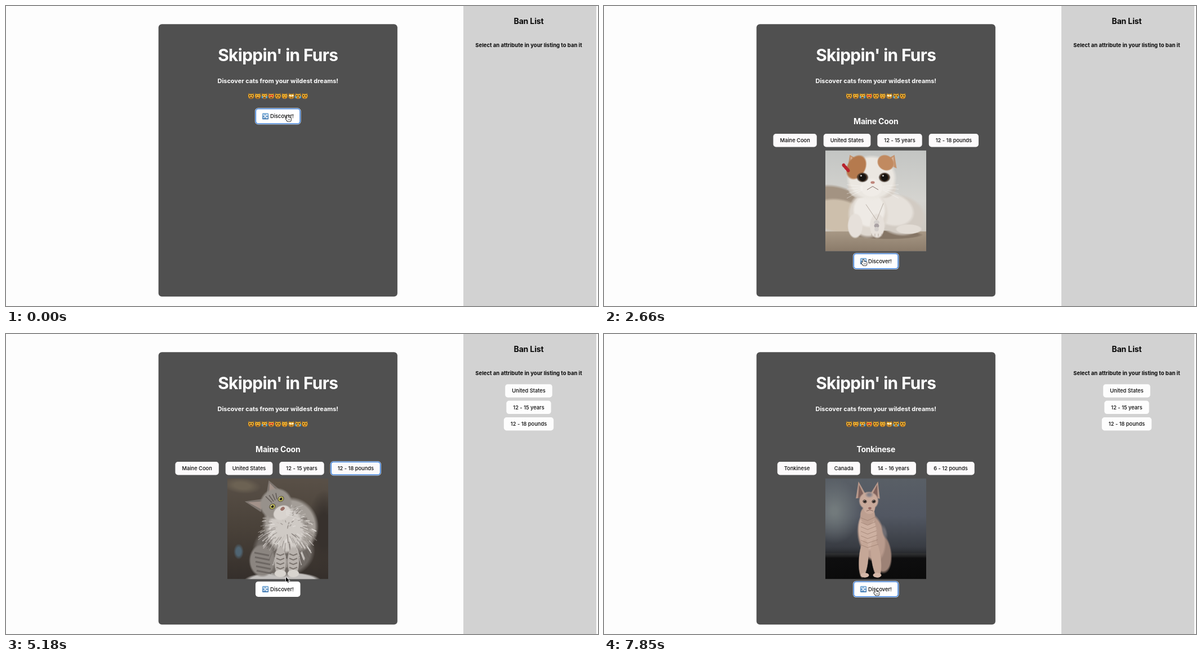
Animation, 1051 px wide and 533 px high, one loop 8000 ms. Source, as an HTML page with a canvas:

```html
<!DOCTYPE html>
<html lang="en">
<head>
<meta charset="utf-8">
<title>Skippin' in Furs</title>
<style>
  html, body { margin: 0; width: 100%; height: 100%; overflow: hidden; background: #fdfdfd; }
  canvas { display: block; width: 1051px; height: 533px; }
</style>
</head>
<body>
<canvas id="stage"></canvas>
<script>
const W = 1051, H = 533, LOOP = 8000, STEP = 148;
const MID = 482.75, PANEL_MID = 928, ROW_Y = 227, TAG_H = 23.5;
const FONT = 'Inter, "Open Sans", sans-serif';
const PHOTO = { x: 393, y: 256.5, size: 179 };

const canvas = document.getElementById('stage');
const ctx = canvas.getContext('2d');
const ratio = window.devicePixelRatio || 1;
canvas.width = Math.round(W * ratio);
canvas.height = Math.round(H * ratio);

const listings = [
  { at: 140, tags: ['Exotic Shorthair', 'United States', '12 - 15 years', '7 - 14 pounds'] },
  { at: 2660, tags: ['Maine Coon', 'United States', '12 - 15 years', '12 - 18 pounds'] },
  { at: 5920, tags: ['Sphynx', 'Canada', '12 - 14 years', '6 - 12 pounds'] },
  { at: 7850, tags: ['Tonkinese', 'Canada', '14 - 16 years', '6 - 12 pounds'] }
];
const photos = [
  { at: 590, draw: drawShorthair },
  { at: 3100, draw: drawCoon },
  { at: 6510, draw: drawSphynx }
];
const bans = [
  { at: 3980, label: 'United States' },
  { at: 4280, label: '12 - 15 years' },
  { at: 4730, label: '12 - 18 pounds' }
];
const focuses = [{ at: 0, label: 'Discover!' }, ...bans, { at: 5920, label: 'Discover!' }];

// Where the pointer tip arrives, when, and how long it rests
const stops = [
  { at: 0, x: 500, y: 194.5, rest: 148 },
  { at: 740, x: 341, y: 267.5, rest: 0 },
  { at: 1184, x: 364, y: 260, rest: 148 },
  { at: 2368, x: 460.5, y: 450.5, rest: 296 },
  { at: 3552, x: 440.5, y: 237, rest: 592 },
  { at: 4292, x: 526, y: 238, rest: 0 },
  { at: 4736, x: 621, y: 238, rest: 148 },
  { at: 5180, x: 497, y: 432, rest: 0 },
  { at: 5624, x: 502, y: 448, rest: 740 },
  { at: 7252, x: 482.5, y: 454, rest: LOOP }
];

const latest = (list, t) => list.filter(e => e.at <= t).pop();
const mix = (a, b, u) => a + (b - a) * u;

function noise(i) {
  const v = Math.sin(i * 12.9898) * 43758.5453;
  return v - Math.floor(v);
}

function pointerAt(t) {
  const s = Math.floor((t + 17) / STEP) * STEP;
  const a = latest(stops, s), b = stops[stops.indexOf(a) + 1] || a;
  const leave = a.at + a.rest;
  const u = s <= leave ? 0 : (s - leave) / (b.at - leave);
  return { x: mix(a.x, b.x, u), y: mix(a.y, b.y, u) };
}

function box(x, y, w, h, r, fill) {
  ctx.beginPath();
  ctx.roundRect(x, y, w, h, r);
  ctx.fillStyle = fill;
  ctx.fill();
}

function text(str, x, y, size, weight, color, spacing = 0) {
  ctx.font = `${weight} ${size}px ${FONT}`;
  ctx.letterSpacing = spacing * size + 'px';
  ctx.textAlign = 'center';
  ctx.fillStyle = color;
  ctx.fillText(str, x, y);
}

function tagWidth(label) {
  ctx.font = `500 9.3px ${FONT}`;
  ctx.letterSpacing = '0px';
  return ctx.measureText(label).width + 24;
}

function oval(color, x, y, rx, ry = rx, turn = 0) {
  ctx.beginPath();
  ctx.ellipse(x, y, rx, ry, turn, 0, 7);
  ctx.fillStyle = color;
  ctx.fill();
}

// Oval with a soft rim
function soft(color, x, y, rx, ry, turn = 0, core = .85) {
  const g = ctx.createRadialGradient(0, 0, core, 0, 0, 1);
  g.addColorStop(0, color);
  g.addColorStop(1, color + '00');
  ctx.save();
  ctx.translate(x, y);
  ctx.rotate(turn);
  ctx.scale(rx, ry);
  oval(g, 0, 0, 1);
  ctx.restore();
}

function trace(points) {
  ctx.beginPath();
  for (const [x, y] of points) ctx.lineTo(x, y);
}

function poly(color, ...points) {
  trace(points);
  ctx.closePath();
  ctx.fillStyle = color;
  ctx.fill();
}

function line(color, width, ...points) {
  trace(points);
  ctx.strokeStyle = color;
  ctx.lineWidth = width;
  ctx.stroke();
}

function fade(top, bottom, ...colors) {
  const g = ctx.createLinearGradient(0, top, 0, bottom);
  colors.forEach((c, i) => g.addColorStop(i / (colors.length - 1), c));
  return g;
}

function band(top, bottom, ...colors) {
  ctx.fillStyle = fade(top, bottom, ...colors);
  ctx.fillRect(0, top, PHOTO.size, bottom - top);
}

function ear(x, y, turn, half, len, color, inner) {
  ctx.save();
  ctx.translate(x, y);
  ctx.rotate(turn);
  poly(color, [-half, 0], [0, -len], [half, 0]);
  poly(inner, [-half * .6, 0], [0, -len * .8], [half * .6, 0]);
  ctx.restore();
}

function eye(x, y, r, iris, pupil, turn = 0) {
  soft('#2b2420', x, y, r * 1.3, r * 1.1, turn, .7);
  oval(iris, x, y, r, r * .85, turn);
  oval('#15120f', x, y, pupil);
  oval('#ffffffcc', x - r * .3, y - r * .35, r * .18);
}

// Short strands that point away from the centre of a coat
function fur(colors, count, x, y, rx, ry, len) {
  for (let i = 0; i < count; i++) {
    const a = noise(i) * Math.PI * 2, r = Math.sqrt(noise(i + 500));
    const px = x + Math.cos(a) * rx * r, py = y + Math.sin(a) * ry * r;
    const dx = Math.cos(a) * len * .6, dy = (Math.sin(a) + .6) * len * .7;
    line(colors[i % colors.length], 1 + noise(i + 900), [px, py], [px + dx, py + dy]);
  }
}

function drawShorthair() {
  band(0, 179, '#c3c5c3', '#d5d4d0', '#c9c1b6');
  soft('#a39382', 18, 96, 58, 34, .25);
  soft('#cdbfac', 22, 116, 52, 31, .15);
  band(144, 179, '#a79885', '#8b7b6a');
  soft('#857565', 112, 150, 62, 8);
  soft('#d2cbc3', 132, 115, 47, 37, .25);
  soft('#e6e1db', 118, 105, 42, 30, .3);
  soft('#ded7cf', 76, 114, 37, 43);
  soft('#eeeae5', 78, 106, 30, 32);
  for (const x of [53, 92]) soft('#e6e0da', x, 134, 14, 23);
  soft('#e3ddd6', 148, 140, 24, 9);
  for (const s of [-1, 1]) {
    ear(83 + s * 31, 26, s * .45, 14, 20, '#c5946f', '#d9b49a');
    soft('#d8d1c9', 83 + s * 22, 66, 22, 20);
  }
  soft('#ebe7e1', 82, 49, 45, 41);
  soft('#b57a4e', 55, 30, 17, 24, .5);
  soft('#c18a60', 107, 22, 16, 14, .6);
  soft('#f0ece7', 82, 66, 21, 17);
  for (const x of [66, 105]) eye(x, 48, 8.5, '#4b3524', 6.4);
  oval('#bd8379', 84, 57, 3.6, 2.3);
  line('#82706a', 1, [74, 70], [84, 64], [94, 70]);
  for (const s of [-1, 1]) {
    for (let i = 0; i < 4; i++) line('#ffffffb0', .6, [84 + s * 18, 64 + i * 2], [84 + s * 46, 61 + i * 8]);
  }
  for (let i = 0; i < 3; i++) oval('#b8222c', 33 + i * 3.5, 27 + i * 4, 4, 3, 1);
  line('#a89d94', .8, [72, 96], [91, 124], [103, 94]);
  for (let i = 0; i < 3; i++) oval(i % 2 ? '#a9a1a3' : '#d4cfcc', 91, 128 + i * 6, 5 - i * .6, 4);
  for (let i = 0; i < 4; i++) line('#a99d92', .8, [82 + i * 6, 148], [82 + i * 6, 153]);
}

function drawCoon() {
  band(0, 179, '#595047', '#494139', '#352f2b');
  soft('#6c6253', 26, 13, 34, 14, .1, .4);
  soft('#37312d', 172, 92, 30, 72, 0, .4);
  soft('#4f6472', 20, 130, 9, 14, 0, .5);
  soft('#c3c0be', 98, 181, 68, 15);
  soft('#6f6964', 100, 128, 56, 48);
  soft('#8b8580', 62, 146, 24, 30);
  soft('#a49e98', 112, 84, 50, 52, -.5);
  soft('#cfcac5', 104, 92, 34, 42);
  fur(['#e6e2deb0', '#8c8681a0', '#c6c0bba0', '#665f5a80'], 230, 106, 98, 45, 48, 14);
  for (const x of [94, 117]) {
    soft('#b9b3ae', x, 148, 11, 28);
    soft('#d8d4cf', x, 169, 11, 7);
    for (let i = 0; i < 4; i++) line('#615a55b0', 2, [x - 7, 134 + i * 8], [x, 137 + i * 8], [x + 7, 134 + i * 8]);
  }
  for (let i = 0; i < 5; i++) line('#514a4680', 3, [48 + i, 132 + i * 8], [74 + i, 137 + i * 8]);
  ear(62, 48, -1.35, 12, 32, '#7d756f', '#a3928a');
  ear(82, 27, -.35, 14, 25, '#7d756f', '#a3928a');
  soft('#97918b', 86, 45, 30, 28, -.5);
  soft('#d8d3ce', 97, 61, 17, 13, -.5);
  for (let i = 0; i < 4; i++) line('#4c4540b0', 1.6, [68 + i * 6, 32 - i * 2], [79 + i * 3, 43 - i * 2]);
  eye(80, 50, 5, '#b2ad55', 2.2, -.6);
  eye(95, 36.5, 5, '#b2ad55', 2.2, -.6);
  soft('#9c7168', 98, 54, 4.5, 3.2, -.6);
  for (let i = 0; i < 4; i++) line('#ffffff90', .5, [104, 58 + i * 2], [134, 48 + i * 9]);
}

function drawSphynx() {
  band(0, 133, '#595f66', '#525762', '#33363c');
  soft('#727a7c', 16, 58, 46, 58, 0, .1);
  band(120, 142, '#33363c00', '#0e0e0f');
  band(141, 179, '#0e0e0f', '#0b0b0b');
  soft('#9d8276', 99, 132, 19, 38, -.15);
  soft('#b99b8d', 82, 104, 25, 46, -.2);
  soft('#cdb0a1', 75, 94, 17, 36, -.1);
  soft('#6f6d73', 105, 95, 5, 15, -.25, .3);
  soft('#bd9f90', 75, 66, 14, 18);
  for (const x of [68, 90]) {
    soft('#c5a797', x, 142, 9, 36, x < 80 ? .08 : -.12);
    soft('#d4b7a8', x + 2, 172, 8, 4.5);
  }
  for (let i = 0; i < 7; i++) line('#957668a0', 1, [63, 70 + i * 8], [75, 75 + i * 8], [88 + i, 69 + i * 8]);
  ear(64, 34, -.18, 10, 29, '#b6988b', '#80625c');
  ear(87, 34, .22, 10, 29, '#b6988b', '#80625c');
  soft('#c9aa9b', 77, 40, 18, 17);
  soft('#c9aa9b', 78, 53, 11, 11);
  soft('#858087', 78, 29, 8, 6, 0, .3);
  for (const s of [-1, 1]) eye(78 + s * 8, 41, 3.2, '#66544e', 1.8, -s * .3);
  oval('#93665f', 79, 53, 2.8, 1.9);
  line('#80645a', .9, [73, 58], [79, 56], [85, 58]);
}

const moods = ['open', 'grin', 'tears', 'hearts', 'smirk', 'kiss', 'scared', 'sad', 'cross'];
const eyeColors = { hearts: '#df252e', scared: '#fff3dc' };
const dropColors = { tears: '#4ba8e8', sad: '#55aee9', scared: '#a57c40' };

function drawFace(mood, x, y) {
  const drop = dropColors[mood], wide = moods.indexOf(mood) < 4, wink = ['grin', 'tears', 'kiss'].includes(mood);
  ctx.save();
  ctx.translate(x, y);
  for (const s of [-1, 1]) ear(s * 3, -1.6, s * .35, 2.2, 4, '#d9951f', '#8f5a22');
  oval(fade(-5, 5, '#f8c63f', '#d78f22'), 0, .5, 5.1, 4.6);
  for (let i = -1; i < 2; i++) line('#8b5616', .6, [i * 1.1, -3.9], [i * .9, -2.6]);
  for (const s of [-1, 1]) {
    line('#8b5616', .6, [s * 5, 1.4], [s * 3.5, 1.7]);
    if (wink) line('#4b2d10', .9, [s * 3.2, -.3], [s * 2.1, -1.2], [s, -.3]);
    else oval(eyeColors[mood] || '#422a15', s * 2.1, -.6, eyeColors[mood] ? 1.7 : 1, 1.4);
    if (drop) oval(drop, s * 3.9, 2, 1.3, 2);
  }
  if (wide) line('#fff', .7, [-1.9, 2.2], [1.9, 2.2]);
  oval('#613016', 0, 3, wide ? 2.4 : 1.4, wide ? 1 : .8);
  ctx.restore();
}

function drawShuffle(x, y) {
  box(x, y, 11.4, 11.4, 1.5, fade(y, y + 11, '#85b4dc', '#4e83b8'));
  ctx.save();
  ctx.translate(x + 5.7, y + 5.7);
  for (const s of [-2.3, 2.3]) {
    line('#fff', 1.1, [-4.2, -s], [-2, -s], [1, s], [2.4, s]);
    poly('#fff', [2, s - 1.8], [4.7, s], [2, s + 1.8]);
  }
  ctx.restore();
}

const within = (p, x, y, w, h) => p.x > x && p.x < x + w && p.y > y && p.y < y + h;

function button(x, y, w, h, fill, focused, hovered) {
  const ring = (grow, color) => box(x - grow, y - grow, w + 2 * grow, h + 2 * grow, 4.8 + grow, color);
  if (focused) {
    ring(1, '#fff');
    ring(.3, '#1767d2');
    ring(-1.1, fill);
  } else {
    ring(0, hovered ? '#646cff' : fill);
    if (hovered) ring(-.7, fill);
  }
}

function tag(label, x, y, w, fill, focused, hovered) {
  button(x, y, w, TAG_H, fill, focused, hovered);
  text(label, x + w / 2, y + 15.1, 9.3, 500, '#080808');
}

function drawHand() {
  const shape = new Path2D();
  shape.roundRect(-1, 0, 2, 8, 1);
  for (let i = 1; i < 4; i++) shape.roundRect(-1 + i * 1.7, 3 + i * .4, 2, 5, 1);
  shape.roundRect(-1.4, 5, 7.4, 5.6, 2.4);
  shape.ellipse(-1.6, 6.8, 1, 2.4, -.7, 0, 7);
  ctx.strokeStyle = '#111';
  ctx.lineWidth = 1.5;
  ctx.stroke(shape);
  ctx.fillStyle = '#fff';
  ctx.fill(shape);
  for (let i = 0; i < 3; i++) line('#111', .5, [1 + i * 1.6, 6.4], [1 + i * 1.6, 8.8]);
}

function drawArrow() {
  const shape = [[0, 0], [0, 8.6], [2, 6.8], [3.4, 9.8], [4.9, 9.2], [3.5, 6.2], [6, 6.1]];
  line('#fff', 1.5, ...shape, shape[0]);
  poly('#000', ...shape);
}

function drawPhoto(photo) {
  ctx.save();
  ctx.translate(PHOTO.x, PHOTO.y);
  ctx.beginPath();
  ctx.rect(0, 0, PHOTO.size, PHOTO.size);
  ctx.clip();
  photo.draw();
  ctx.restore();
}

// Tags share the row with even space between and around them
function drawTags(labels, focus, pointer) {
  const row = 388.5, widths = labels.map(tagWidth);
  const gap = (row - widths.reduce((a, b) => a + b)) / (labels.length + 1);
  let x = MID - row / 2 + gap, over = false;
  labels.forEach((label, i) => {
    const hover = within(pointer, x, ROW_Y, widths[i], TAG_H);
    tag(label, x, ROW_Y, widths[i], '#fcfafb', focus === label, hover);
    over = over || hover;
    x += widths[i] + gap;
  });
  return over;
}

function drawDiscover(y, focus, pointer) {
  const w = 79.6, h = 27.3, x = MID - w / 2;
  const hover = within(pointer, x, y, w, h);
  button(x, y, w, h, '#fff', focus === 'Discover!', hover);
  drawShuffle(x + 11.9, y + 8);
  text('Discover!', x + 47, y + 17.2, 9.3, 500, '#080808');
  return hover;
}

function draw(t) {
  const pointer = pointerAt(t), focus = latest(focuses, t).label;
  const listing = latest(listings, t), photo = latest(photos, t);

  ctx.setTransform(ratio, 0, 0, ratio, 0, 0);
  box(0, 0, W, H, 0, '#fdfdfd');
  box(812, 0, 236, H, 0, '#d2d2d2');
  box(270.7, 32.3, 424.2, 484, 6, '#505050');
  text("Skippin' in Furs", MID, 98, 29.8, 700, '#fff', -.021);
  text('Discover cats from your wildest dreams!', MID, 137.2, 10.9, 700, '#fff');
  moods.forEach((mood, i) => drawFace(mood, MID + (i - 4) * 11.92, 160));

  let hand = false;
  if (listing) {
    text(listing.tags[0], MID, 209.8, 14, 700, '#fff', -.016);
    hand = drawTags(listing.tags, focus, pointer);
  }
  if (photo) drawPhoto(photo);
  hand = drawDiscover(listing ? 439.7 : 182.2, focus, pointer) || hand;

  text('Ban List', PANEL_MID, 32.2, 14, 700, '#080808', -.01);
  text('Select an attribute in your listing to ban it', PANEL_MID, 73, 9.5, 700, '#080808');
  bans.filter(b => b.at <= t).forEach(({ label }, i) => {
    const w = tagWidth(label);
    tag(label, PANEL_MID - w / 2, 89.2 + i * 29.4, w, '#fdfdfd');
  });

  ctx.save();
  ctx.translate(pointer.x, pointer.y);
  if (hand) drawHand();
  else drawArrow();
  ctx.restore();
}

const start = performance.now();
function tick() {
  draw((performance.now() - start) % LOOP);
  requestAnimationFrame(tick);
}
tick();
</script>
</body>
</html>
```
